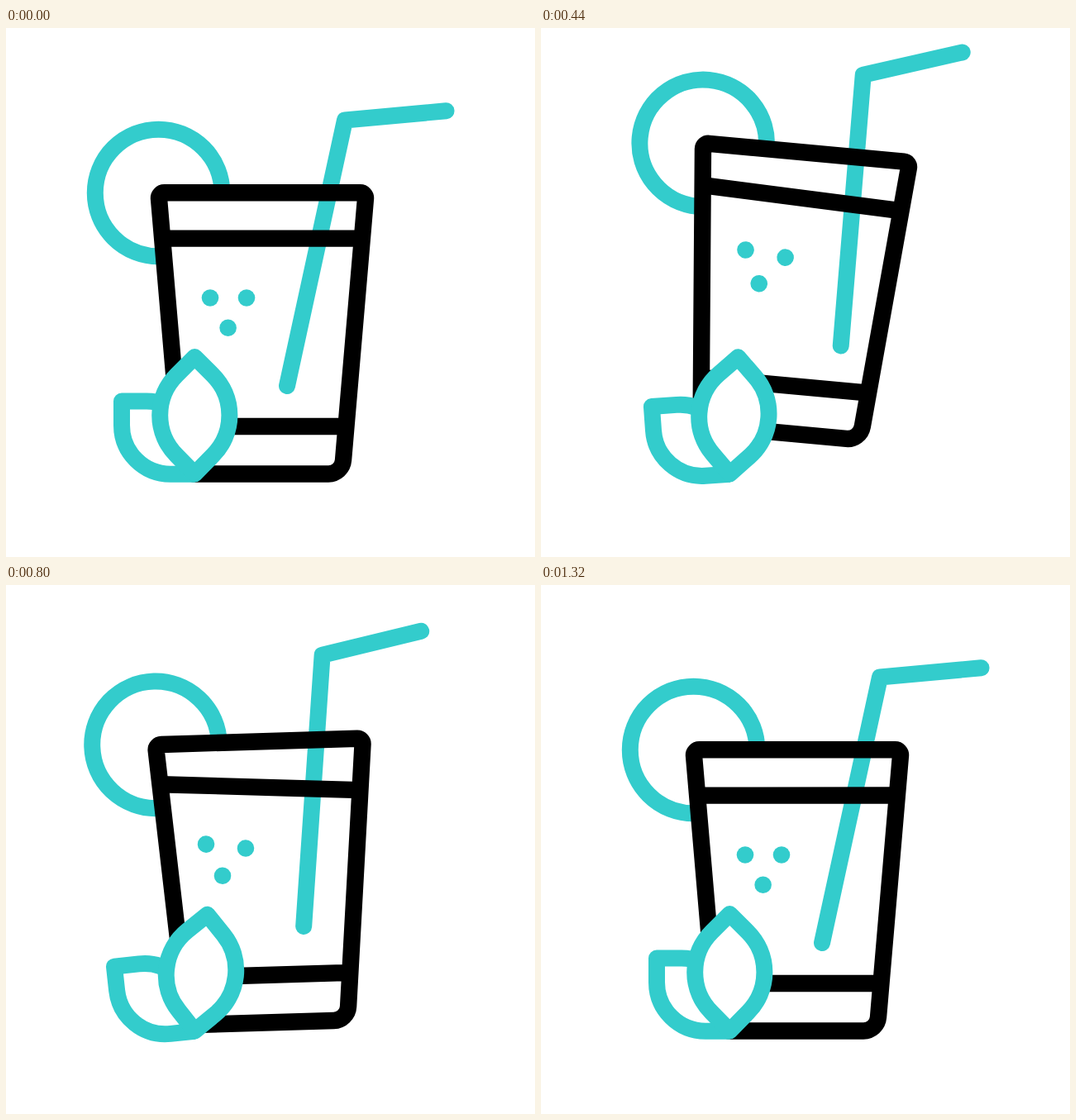
Recreate the animation shown at these times as an HTML page. Size 640x640 px, loop 2 s.

```html
<!DOCTYPE html>
<html>
<head>
<meta charset="utf-8">
<style>
  html, body { margin: 0; height: 100%; overflow: hidden; background: #fff; }
  svg { display: block; width: 100%; height: 100%; }
  .line { fill: none; stroke: #000; stroke-width: 20.4; stroke-linejoin: round; }
  .teal { stroke: #33cccc; stroke-width: 20; }
  .leaf { fill: #fff; }
  .dot { fill: #33cccc; }
</style>
</head>
<body>
<svg viewBox="0 0 640 640">
  <g id="drink">
    <path class="line teal" d="M261.4 199.5A76.8 76.8 0 1 0 184.6 276.3h4"/>
    <path id="straw" class="line teal" stroke-linecap="round" d="M340 433L410 111.5L532.5 100.3"/>
    <path class="line" d="M191.5 199.3H428.5a6.5 6.5 0 0 1 6.5 7L408 523a18 18 0 0 1-18 16.5H230a18 18 0 0 1-18-16.5L185 206.3a6.5 6.5 0 0 1 6.5-7zM208 482H412"/>
    <path id="surface" class="line" d="M190 254.6H430"/>
    <circle class="dot" r="10.3"/>
    <circle class="dot" r="10.3"/>
    <circle class="dot" r="10.3"/>
  </g>
  <path id="smallLeaf" class="line teal leaf" d="M228.5 539.7H199a59 59 0 0 1-59-59V451.5h30c16 0 30 6 40 16"/>
  <path id="bigLeaf" class="line teal leaf" d="M228.3 398l22 22a68.6 68.6 0 0 1 0 97l-22 22.5l-22-22.5a68.6 68.6 0 0 1 0-97z"/>
</svg>
<script>
const LOOP = 2000, STEP = 40;
const byId = id => document.getElementById(id);
const dots = document.querySelectorAll('.dot');

// Keyframe tracks: times in ms and values, eased between neighbours
const rise = [[83, 500, 917], [0, -52, 0]];
const tilt = [[83, 283, 467, 750, 917], [0, -6.2, 6, -2.2, 0]];
const strawLift = [[250, 667, 1083], [0, -13.2, 0]];
const strawTurn = [[210, 372, 660, 833, 1083, 1220], [0, -16, 6.3, -8, -6.5, 0]];
const leafTurn = [[197, 597, 800, 1200], [0, 6.2, 6.2, 0]];
const slosh = [83, 350, 625, 833, 1083, 1333];
const surfaceTurn = [slosh, [0, 4.6, -5.4, 4, -1.8, 0]];
const dotPaths = [
  { x: 247, y: 326.5, dx: [0, 1.4, -1.7, -5.3, 1, 0], dy: [0, -6.4, 6.4, -5.8, 0.5, 0] },
  { x: 291, y: 326.5, dx: [0, 5.2, 5.8, -1.8, 0.5, 0], dy: [0, 6.2, -12.4, 2.4, -3.5, 0] },
  { x: 268.6, y: 362.7, dx: [0, -5.4, 11.8, -9.3, 4, 0], dy: [0, 0.8, -3.4, -2.4, -2, 0] }
];

function valueAt(t, [times, values]) {
  if (t <= times[0]) return values[0];
  const i = times.findIndex(time => time > t);
  if (i < 0) return values[values.length - 1];
  const p = (t - times[i - 1]) / (times[i] - times[i - 1]);
  return values[i - 1] + (values[i] - values[i - 1]) * p * p * (3 - 2 * p);
}

function place(id, angle, x, y, lift = 0) {
  byId(id).setAttribute('transform', `translate(0 ${lift}) rotate(${angle} ${x} ${y})`);
}

function draw(t) {
  place('drink', valueAt(t, tilt), 310, 319.5, valueAt(t, rise));
  place('straw', valueAt(t, strawTurn), 361, 287, valueAt(t, strawLift));
  place('surface', valueAt(t, surfaceTurn), 310, 254.6);
  const leaf = valueAt(t, leafTurn);
  place('bigLeaf', leaf, 228.5, 539.7);
  place('smallLeaf', -leaf, 228.5, 539.7);
  dotPaths.forEach(({ x, y, dx, dy }, i) => {
    dots[i].setAttribute('cx', x + valueAt(t, [slosh, dx]));
    dots[i].setAttribute('cy', y + valueAt(t, [slosh, dy]));
  });
}

const start = performance.now();
function tick() {
  const t = (performance.now() - start) % LOOP;
  draw(Math.floor(t / STEP) * STEP);
  requestAnimationFrame(tick);
}
tick();
</script>
</body>
</html>
```
